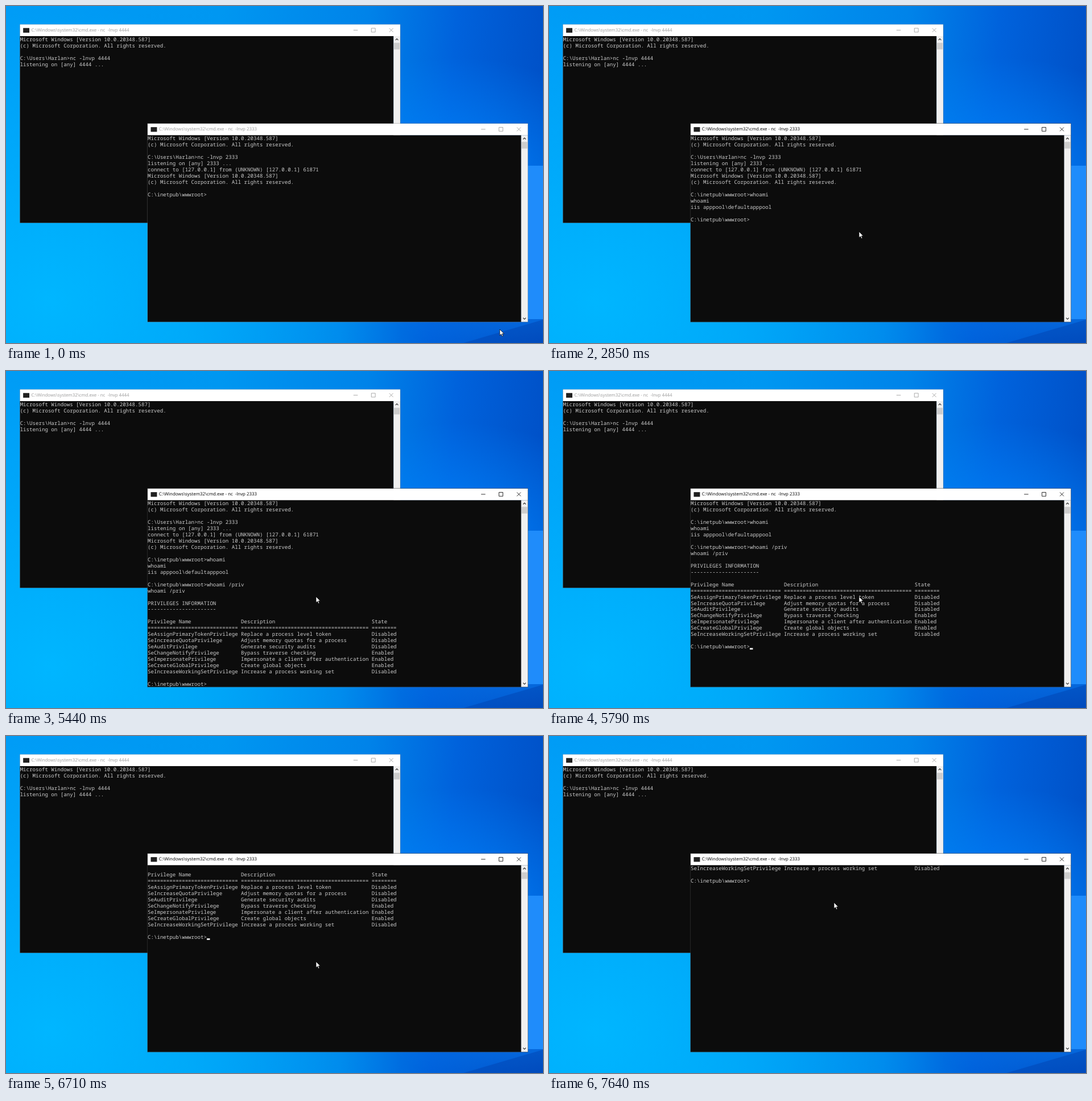
An HTML page for the animation above (8000 ms loop, 944x593 px).

```html
<!DOCTYPE html>
<html lang="en">
<head>
<meta charset="utf-8">
<title>Two consoles</title>
<style>
  html, body { margin: 0; width: 100%; height: 100%; overflow: hidden; }
  #stage {
    position: relative; width: 944px; height: 593px; overflow: hidden;
    text-rendering: geometricPrecision;
    background:
      radial-gradient(ellipse 250px 60px at 930px 550px, rgba(10, 125, 240, .55), rgba(10, 125, 240, 0)),
      radial-gradient(ellipse 330px 230px at 790px 320px, rgba(0, 135, 255, .9), rgba(0, 135, 255, 0)),
      radial-gradient(ellipse 620px 520px at 80px 520px, #00b6ff, rgba(0, 182, 255, 0)),
      linear-gradient(95deg, #009cf6 0%, #0097f1 38%, #0083e9 64%, #0062dc 80%, #004dc3 100%);
  }
  #stage > * { position: absolute; left: 0; top: 0; }
  #stage > #wedge { left: 804px; top: 552px; width: 140px; height: 41px; background: rgba(0, 62, 168, .4); clip-path: polygon(0 100%, 100% 0, 100% 100%); }
  #stage > #pane { left: 917px; top: 281px; width: 27px; height: 270px; background: #1f8cfb; }

  /* Windows are laid out in desktop pixels; the desktop is shown at 68.4 %. */
  .win { width: 977px; height: 510px; transform-origin: 0 0; --ink: #999; --edge: rgba(119, 119, 119, .5); }
  .win.active { --ink: #000; --edge: rgba(68, 68, 68, .7); }
  .win > * { position: absolute; left: 0; top: 0; margin: 0; white-space: pre; }
  .chrome { overflow: visible; fill: none; }
  .win > .title { left: 29px; color: var(--ink); font: 11.5px/29px "Open Sans", "Noto Sans", sans-serif; }
  .win > .text { top: 30px; color: #ccc; font: 13.3333px/16px "Noto Sans Mono", "Liberation Mono", monospace; }
  .caret { width: 8px; height: 4px; background: #f2f2f2; }
</style>
</head>
<body>
<div id="stage">
  <div id="wedge"></div>
  <div id="pane"></div>
</div>
<script>
const LOOP = 8000, SCALE = .684, CELL_W = 8, CELL_H = 16, BAR = 30, CARET_H = 4;
const stage = document.getElementById('stage');

const banner = ['Microsoft Windows [Version 10.0.20348.587]', '(c) Microsoft Corporation. All rights reserved.', ''];
const listen = port => [...banner, `C:\\Users\\Harlan>nc -lnvp ${port}`, `listening on [any] ${port} ...`];
const row = (name, about, state) => name.padEnd(30) + about.padEnd(42) + state;
const rule = n => '='.repeat(n);
const PROMPT = 'C:\\inetpub\\wwwroot>';

const log = [
  ...listen(2333),
  'connect to [127.0.0.1] from (UNKNOWN) [127.0.0.1] 61871',
  ...banner,
  PROMPT + 'whoami',
  'whoami',
  'iis apppool\\defaultapppool',
  '',
  PROMPT + 'whoami /priv',
  'whoami /priv',
  '',
  'PRIVILEGES INFORMATION',
  '-'.repeat(22),
  '',
  row('Privilege Name', 'Description', 'State'),
  row(rule(29), rule(41), rule(8)),
  row('SeAssignPrimaryTokenPrivilege', 'Replace a process level token', 'Disabled'),
  row('SeIncreaseQuotaPrivilege', 'Adjust memory quotas for a process', 'Disabled'),
  row('SeAuditPrivilege', 'Generate security audits', 'Disabled'),
  row('SeChangeNotifyPrivilege', 'Bypass traverse checking', 'Enabled'),
  row('SeImpersonatePrivilege', 'Impersonate a client after authentication', 'Enabled'),
  row('SeCreateGlobalPrivilege', 'Create global objects', 'Enabled'),
  row('SeIncreaseWorkingSetPrivilege', 'Increase a process working set', 'Disabled'),
  ''
];

function makeWindow(x, y, port) {
  const win = document.createElement('div');
  win.className = 'win';
  win.style.transform = `translate(${x}px, ${y}px) scale(${SCALE})`;
  win.innerHTML = `
    <svg class="chrome" width="977" height="510">
      <path style="fill:var(--edge)" d="M-1-1h979v512h-979z"/>
      <path fill="#fff" d="M0 0h977v30h-977z"/>
      <path fill="#0c0c0c" d="M0 30h960v480h-960z"/>
      <path fill="#202020" d="M8 9h16v12h-16z"/>
      <path style="stroke:var(--ink)" stroke-width="1.2" d="M857 14.5h11M903 9.5h10v10h-10zM949 9.5l10 10m0-10l-10 10"/>
      <path fill="#f0f0f0" d="M960 30h17v480h-17z"/>
      <path class="thumb" fill="#cdcdcd" d="M961 47h15v17h-15z"/>
      <path stroke="#444" stroke-width="1.9" d="M965 40.3l3.5-3.5 3.5 3.5M965 499.7l3.5 3.5 3.5-3.5"/>
    </svg>
    <div class="title">C:\\Windows\\system32\\cmd.exe - nc  -lnvp ${port}</div>
    <pre class="text"></pre>
    <div class="caret" hidden></div>`;
  stage.append(win);
  const part = name => win.querySelector('.' + name);
  return { win, text: part('text'), caret: part('caret'), thumb: part('thumb') };
}

const back = makeWindow(24.65, 32.6, 4444);
back.text.textContent = listen(4444).join('\n');
const front = makeWindow(249, 207, 2333);

stage.insertAdjacentHTML('beforeend', `
  <svg id="mouse" width="10" height="15" style="overflow:visible">
    <path d="M0 0v10.6l2.5-2.3 1.7 3.9 1.7-.8-1.7-3.7h3.3z" fill="#fff" stroke="#000" stroke-width=".7"/>
  </svg>`);
const mouse = document.getElementById('mouse');

// Each step: [time, changes]. "done" counts finished lines, "line" is the one being typed.
const type = (word, from, times) =>
  times.map((t, i) => [t, { line: PROMPT + word.slice(0, from + i), caret: true }]);
const scroll = (t, top) => [t, { top, caret: true }];
const move = (t, x, y) => [t, { x, y }];

const steps = [
  [0, { done: 9, line: PROMPT, top: 0, caret: false, active: false, x: 868, y: 569 }],
  move(70, 770, 517),
  move(130, 640, 448),
  move(200, 545, 397),
  [260, { active: true }],
  [710, { caret: true }],
  [1240, { caret: false }],
  ...type('whoami', 2, [1310, 1450, 1540, 1640, 1740]),
  [1850, { done: 10, line: '' }],
  [1940, { done: 13, line: PROMPT }],
  [2850, { caret: false }],
  ...type('whoami /priv', 1, [3320, 3400, 3480, 3550, 3630, 3710, 3850, 4110, 4310, 4400, 4500, 4600]),
  [4700, { done: 14, line: '' }],
  [4790, { done: 29, line: PROMPT }],
  [5440, { caret: false }],
  scroll(5710, 3),
  scroll(5790, 6),
  scroll(6300, 12),
  scroll(6380, 15),
  scroll(6710, 18),
  scroll(6840, 21),
  scroll(7170, 24),
  scroll(7250, 27),
  move(7330, 539, 382),
  move(7410, 527, 354),
  move(7490, 514, 324),
  move(7570, 504, 300),
  [7640, { x: 501, y: 293, caret: false }]
];

function stateAt(t) {
  return Object.assign({}, ...steps.filter(s => s[0] <= t).map(s => s[1]));
}

function draw(s) {
  front.win.classList.toggle('active', s.active);
  front.text.textContent = [...log.slice(s.top, s.done), s.line].join('\n');
  front.caret.hidden = !s.caret;
  front.caret.style.left = s.line.length * CELL_W + 'px';
  front.caret.style.top = BAR + (s.done - s.top + 1) * CELL_H - CARET_H + 'px';
  front.thumb.setAttribute('transform', `translate(0 ${s.top > 6 ? 1 : 0})`);
  mouse.style.transform = `translate(${s.x}px, ${s.y}px)`;
}

const start = performance.now();
let shown = -1;
function tick() {
  const t = Math.max(0, performance.now() - start) % LOOP;
  const index = steps.filter(s => s[0] <= t).length;
  if (index !== shown) {
    shown = index;
    draw(stateAt(t));
  }
  requestAnimationFrame(tick);
}
tick();
</script>
</body>
</html>
```
